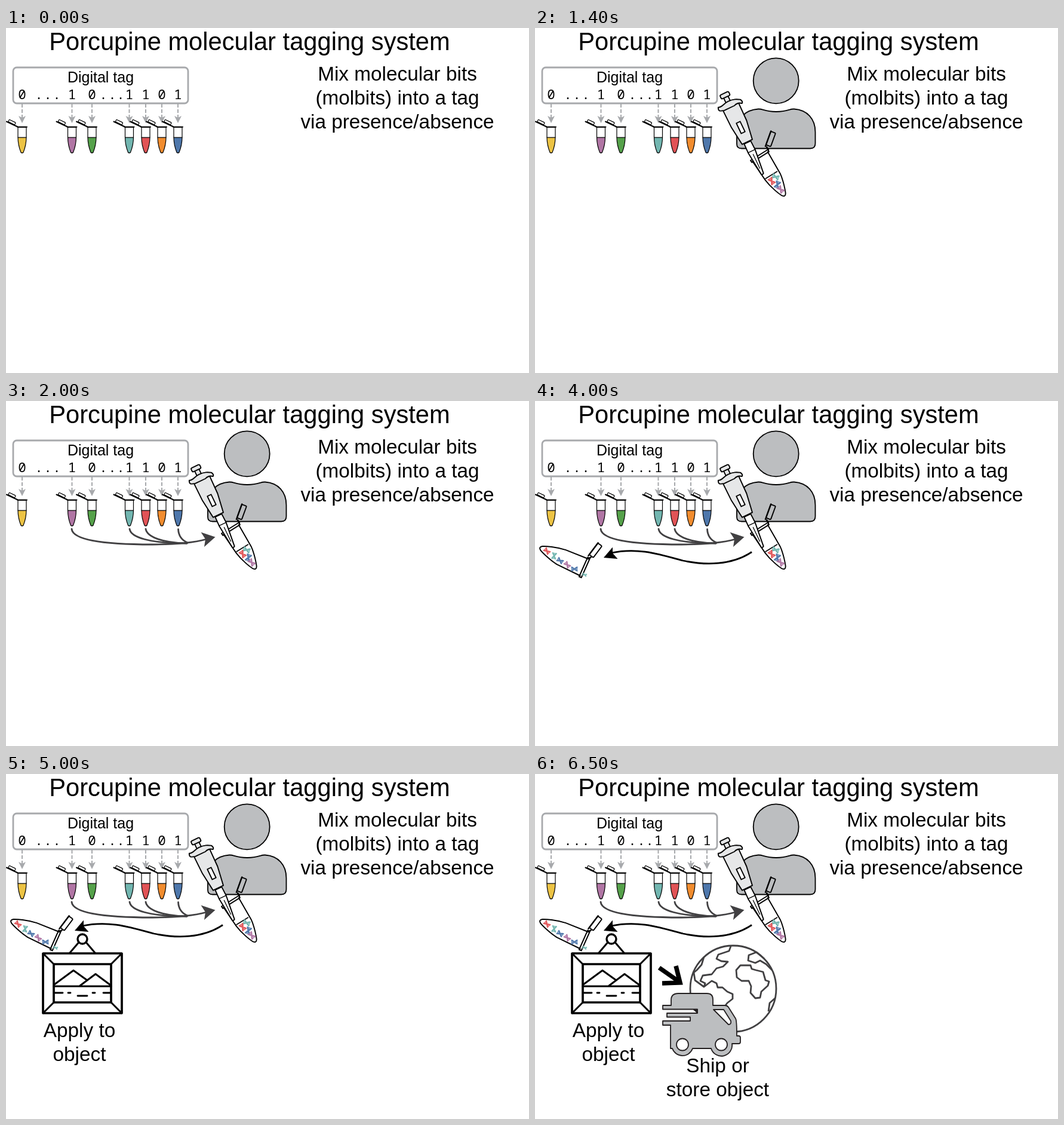
Write an HTML page that moves like this. It is 876 px wide and 577 px high and loops after 8 s.

```html
<!DOCTYPE html>
<html lang="en">
<head>
<meta charset="utf-8">
<title>Molecular tagging system</title>
<style>
  html, body { margin: 0; width: 100%; height: 100%; overflow: hidden; background: #fff; }
  svg { display: block; width: 876px; height: 577px; }
  text { font-family: "Liberation Sans", Arial, sans-serif; font-size: 33.33px; text-anchor: middle; }
  .title { font-size: 41.67px; }
  .label { font-size: 25px; }
  .bits text { font: 22.5px "Noto Sans Mono", "DejaVu Sans Mono", monospace; }
  .ink { stroke: #000; stroke-linejoin: round; stroke-linecap: round; }
  .none { fill: none; }
  .step { animation: 8s step-end infinite; }
  .mix { animation-name: mix; }
  .pool { animation-name: pool; }
  .tag { animation-name: tag; }
  .apply { animation-name: apply; }
  .ship { animation-name: ship; }
  @keyframes mix { 0% { visibility: hidden } 6.25%, 100% { visibility: visible } }
  @keyframes pool { 0% { visibility: hidden } 25%, 100% { visibility: visible } }
  @keyframes tag { 0% { visibility: hidden } 50%, 100% { visibility: visible } }
  @keyframes apply { 0% { visibility: hidden } 62.5%, 100% { visibility: visible } }
  @keyframes ship { 0% { visibility: hidden } 81.25%, 100% { visibility: visible } }
</style>
</head>
<body>
<svg viewBox="0 0 876 577">
  <defs>
    <g id="drop">
      <path d="M0 127V150" stroke="#a7a9ac" stroke-width="2" stroke-dasharray="6 3"/>
      <path d="M0 159L-6 147L0 150L6 147Z" fill="#a7a9ac"/>
    </g>
    <g id="vial" class="ink" stroke-width="1.2">
      <path d="M-7 183H7C7 192 4 203 2 208Q0 210 -2 208C-4 203 -7 192 -7 183Z"/>
      <path d="M-7 166H7V183H-7Z" fill="#fff"/>
      <path d="M-8 165.5H8" stroke-width="2"/>
      <path d="M-26 156.5L-8 165" stroke-width="2"/>
      <rect x="-6" y="-2" width="12" height="4" rx="1" fill="#fff" transform="translate(-17 157.5) rotate(26)"/>
    </g>
    <g id="tube" class="ink none" stroke-width="1.9">
      <path d="M-15 0L-13.5 38C-12 54 -6 70 -3.5 75Q0 80 3.500 75C6 70 12 54 13.5 42L15 0" fill="#fff"/>
      <path d="M-17 -3H17V1H-17Z"/>
    </g>
    <g id="lid" class="ink none" stroke-width="1.9">
      <rect x="-4" y="-12.5" width="8.500" height="24" rx="1.5"/>
      <path d="M-4 -13V14" stroke-width="2.4"/>
    </g>
    <g id="dna" fill="none" stroke-width="2.2">
      <path d="M-6 -3.5C-2 -3.5 2 3.5 6 3.5M-6 3.5C-2 3.5 2 -3.5 6 -3.5"/>
      <path d="M-5 -3V3M-3 -2V2M3 -2V2M5 -3V3" stroke-width="1.4"/>
    </g>
  </defs>

  <text class="title" x="408" y="37">Porcupine molecular tagging system</text>
  <text x="655.5" y="88">Mix molecular bits</text>
  <text x="655.5" y="128">(molbits) into a tag</text>
  <text x="655.5" y="168">via presence/absence</text>

  <rect x="12" y="66" width="293" height="60" rx="6" fill="#fff" stroke="#a7a9ac" stroke-width="2.8"/>
  <text class="label" x="158.5" y="91">Digital tag</text>
  <g id="bits" class="bits"></g>
  <g id="vials"></g>

  <g class="step mix">
    <g fill="#bcbec0" class="ink" stroke-width="1.8">
      <circle cx="403.7" cy="88.3" r="38"/>
      <path d="M346 201.500Q338 201.500 338 194V173C338 151 352 137 374 135.500C382 135 384 140 404 140C424 140 426 135 434 135.500C456 137 469.500 152 469.500 174V193Q469.500 201.500 461 201.500Z"/>
    </g>
    <use href="#tube" transform="translate(377 215) rotate(-32)"/>
    <path class="ink" d="M386 252L405.5 240" stroke-width="1.5"/>
    <path class="ink none" d="M391 204L388 199" stroke-width="2.5"/>
    <use href="#lid" transform="translate(394.5 186) rotate(20)"/>
    <g class="ink" stroke-width="1.9" transform="translate(318 112) rotate(-25.5)">
      <path d="M-6 88H6L6.500 104L2 146Q0 148 -2 146L-6.500 104Z" fill="#fff"/>
      <path d="M-6.500 104H6.500M0 110V136" fill="none" stroke-width="1.3"/>
      <rect x="-4" y="3" width="8" height="12" fill="#e6e7e8"/>
      <rect x="-8" y="-3" width="16" height="7" rx="2" fill="#e6e7e8"/>
      <path d="M-14 22L-13.500 54L-9.500 87H9.500L14.500 54L15 22Z" fill="#e6e7e8"/>
      <path d="M-19 14C-12 17 -9 12 0 12C10 12 15 15 20 18Q23 23 20 25C15 21 11 21 7 23H-12C-16 21 -23 22 -19 14Z" fill="#e6e7e8"/>
      <rect x="-3" y="51" width="7" height="19" fill="#fff"/>
    </g>
    <g id="mixDna"></g>
  </g>

  <g class="step pool">
    <g fill="none" stroke="#414042" stroke-width="2.8" stroke-linecap="round">
      <path d="M110 214C112 232 160 240 245 240C290 240 318 236 336 231"/>
      <path d="M207 214C209 228 240 238 303 238"/>
      <path d="M234 214C236 226 258 237 303 238"/>
      <path d="M288.5 214.5C289 226 295 233 304 237"/>
    </g>
    <path d="M350.500 227.500L326.500 219.500L334 231L332 244Z" fill="#414042"/>
  </g>

  <g class="step tag">
    <use href="#tube" transform="translate(82 278) rotate(114) scale(1.04)"/>
    <path class="ink none" d="M89 264L94 261" stroke-width="2.5"/>
    <use href="#lid" transform="translate(101 250) rotate(37)"/>
    <g id="tagDna"></g>
    <path d="M363 252.5C330 275 285 275 248 267C213 258 175 244 128 254" fill="none" stroke="#000" stroke-width="2.8"/>
    <path d="M115 262L130 244.500L130 254.500L138.500 264Z"/>
  </g>

  <g class="step apply">
    <g class="ink none" stroke-width="3.7">
      <rect x="62" y="300" width="132" height="100" rx="1"/>
      <rect x="80" y="318" width="96" height="64"/>
      <path d="M62 300L80 318M194 300L176 318M62 400L80 382M194 400L176 382" stroke-width="3"/>
      <circle cx="128" cy="276" r="8" stroke-width="3.4"/>
      <path d="M121.5 282L107 299M134.5 282L149 299" stroke-width="3"/>
      <path d="M80 355H176M81 352L113 328.500L136 345M124 354L150 334.500L175 353" stroke-width="3"/>
      <path d="M82 366H95M104 366H108M145 366H149M163 366H175M120 371H136" stroke-width="2.8"/>
    </g>
    <text x="123" y="440">Apply to</text>
    <text x="123" y="480">object</text>
  </g>

  <g class="step ship">
    <path d="M208 324L241 347M236 321L243 349L213 350" fill="none" stroke="#000" stroke-width="7.500"/>
    <g fill="none" stroke="#414042" stroke-width="2.8" stroke-linejoin="round">
      <circle cx="332" cy="359" r="72" fill="#fff"/>
      <path d="M328 288L325 296L307 302L304 309L312 313L323 314L315 322L304 325L296 335L281 337L277 346L285 350L283 356L296 346L304 350L306 357H314L322 364L331 368V376L322 383L316 391L306 398"/>
      <path d="M283 306L279 319L271 328L266 332L268 345L283 356"/>
      <path d="M337 328L344 320H361L363 326L370 328L382 331L386 345L392 347L390 354L379 364L377 374L369 375L361 366L362 355L358 346H346L338 340Z"/>
      <path d="M384 309L371 298L358 303L357 312L369 316L377 312L387 318L397 328"/>
      <path d="M402 375L393 383L391 397"/>
    </g>
    <g fill="#bcbec0" stroke="#231f20" stroke-width="1.8" stroke-linejoin="round">
      <path d="M228 387V378Q228 367 240 367H288Q298 367 298 377V387H318Q322 387 324 390L336 409Q338 412 338 438H341Q344 438 344 441V448Q344 451 341 451H330A18 18 0 0 1 295 459H264A18 18 0 0 1 230 459H227V420H214V413H260V406.5H221V400H272V393.5H214V387Z"/>
      <path d="M299 394H316L328 413Q329 419 324 419L299 394Z" fill="#fff"/>
      <path d="M266 394H272V399Z" fill="#231f20"/>
      <g id="hubs" fill="#fff"></g>
    </g>
    <text x="306" y="499">Ship or</text>
    <text x="306" y="539">store object</text>
  </g>
</svg>
<script>
  const fill = (id, html) => document.getElementById(id).innerHTML = html;
  const red = "#e15356", teal = "#72b6b0", blue = "#4e77ab", purple = "#b075a4";

  const bits = [[27, 0, "#ecc344"], [110.5, 1, purple], [144, 0, "#55a14a"], [206.5, 1, teal],
                [234, 1, red], [261, 0, "#f18c2e"], [288, 1, blue]];
  const dots = [55, 70, 85, 163, 178, 192].map(x => [x, "."]);
  fill("bits", [...bits, ...dots].map(([x, s]) => `<text x="${x}" y="119">${s}</text>`).join(""));

  const at = (id, x, color) => `<use href="#${id}" x="${x}" fill="${color}"/>`;
  fill("vials", bits.map(([x]) => at("drop", x, "none")).join("") +
                bits.map(([x, , c]) => at("vial", x, c)).join(""));

  const dna = ([x, y, turn, color, size = 1]) =>
    `<use href="#dna" stroke="${color}" transform="translate(${x} ${y}) rotate(${turn}) scale(${size})"/>`;
  fill("mixDna", [[403, 249, 20, teal], [396.5, 256, 55, red], [406, 262, 110, blue],
                  [411.5, 270, 50, purple]].map(dna).join(""));
  fill("tagDna", [[20, 251, 45, red, .9], [32, 259, 100, teal, .9], [42, 267, 35, blue, .9],
                  [54, 274, 50, purple, .9], [66, 281, 0, blue, .9], [83, 290.5, 20, teal, .6]].map(dna).join(""));

  fill("hubs", [247, 312].map(x => `<circle cx="${x}" cy="452.5" r="10"/>`).join(""));
</script>
</body>
</html>
```
